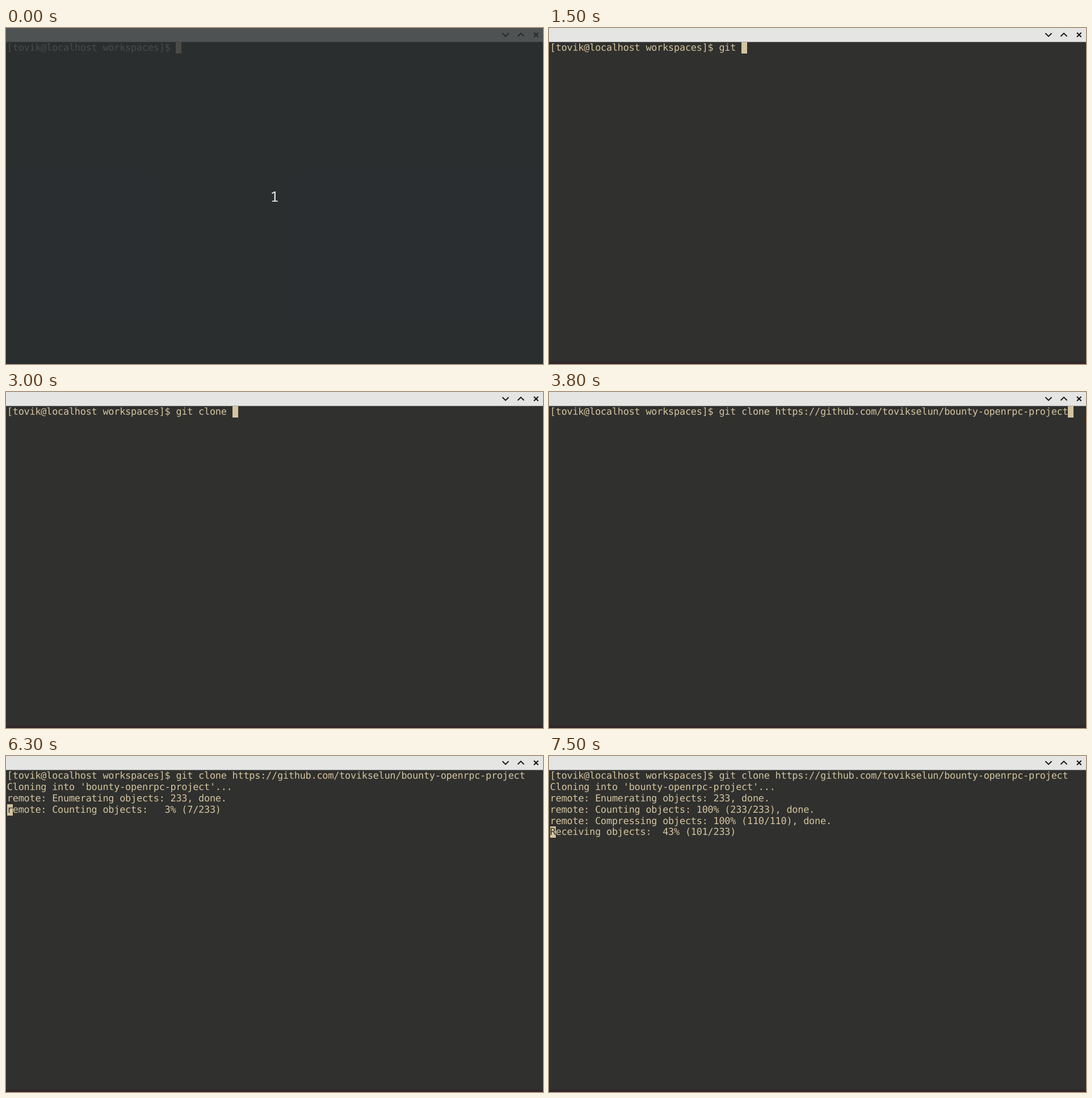
An HTML page for the animation above (8000 ms loop, 946 by 592 pixels).

```html
<!DOCTYPE html>
<html lang="en">
<head>
<meta charset="utf-8">
<title>Terminal: git clone</title>
<style>
  :root { --cell: 9.92px; --row: 19.84px; --left: 1.8px; --top: 25.2px; --ink: #d4c4a0; --paper: #30302e; }
  html, body { margin: 0; width: 100%; height: 100%; overflow: hidden; background: var(--paper); }
  #stage { position: relative; width: 946px; height: 592px; overflow: hidden; background: var(--paper); }
  #stage > * { position: absolute; }
  #bar { left: 0; top: 0; width: 946px; height: 24px; background: #e5e5e3; border-bottom: 1px solid #a3a3a1; }
  #bar path { fill: none; stroke: #161616; stroke-width: 1.9; }
  #edge { left: 0; top: 588px; width: 946px; height: 4px; background: #302629; }
  #screen, #cursor {
    margin: 0; white-space: pre; color: var(--ink);
    font: 16.87px/var(--row) "DejaVu Sans Mono", monospace;
    letter-spacing: calc(var(--cell) - 1ch);
    font-variant-ligatures: none; text-rendering: geometricPrecision;
  }
  #screen { left: var(--left); top: var(--top); }
  #cursor {
    left: calc(var(--left) + var(--col) * var(--cell)); top: calc(var(--top) + var(--line) * var(--row));
    width: var(--cell); height: var(--row); background: var(--ink); color: var(--paper);
  }
  #count {
    inset: 0; background: rgba(40, 45, 48, .8); color: #e9e9e8;
    font: 26px/592px "Noto Sans Mono", monospace; text-align: center;
  }
</style>
</head>
<body>
<div id="stage">
  <svg id="bar" viewBox="0 0 946 24">
    <path d="M874.5 9.3 880 14.7 885.5 9.3M901.5 14.7 907 9.3 912.5 14.7"/>
    <path d="M930 8.2 937.6 15.8M937.6 8.2 930 15.8" style="stroke-width:2.1"/>
  </svg>
  <div id="edge"></div>
  <pre id="screen"></pre>
  <div id="cursor"></div>
  <div id="count">1</div>
</div>
<script>
const LOOP = 8000;
const PROMPT = '[tovik@localhost workspaces]$ ';
const COMMAND = 'git clone https://github.com/tovikselun/bounty-openrpc-project';

// [time, number of command characters entered]
const typing = [
  [0, 0], [1000, 1], [1300, 2], [1400, 3], [1500, 4], [2100, 5],
  [2400, 7], [2600, 8], [2700, 9], [3000, 10], [3800, COMMAND.length]
];

const progress = (label, done, total) => {
  const percent = String(Math.floor(done / total * 100)).padStart(3);
  return `${label} objects: ${percent}% (${done}/${total})`;
};
const counting = n => progress('remote: Counting', n, 233);
const compressing = n => progress('remote: Compressing', n, 110);
const receiving = n => progress('Receiving', n, 233);

const cloning = [PROMPT + COMMAND, "Cloning into 'bounty-openrpc-project'..."];
const listed = [...cloning, 'remote: Enumerating objects: 233, done.'];
const counted = [...listed, counting(233) + ', done.'];
const compressed = [...counted, compressing(110) + ', done.'];

// [time, visible lines]; the cursor waits at the start of the last line
const output = [
  [5000, [...cloning, '']],
  [6300, [...listed, counting(7)]],
  [6500, [...listed, counting(159)]],
  [6900, [...counted, compressing(22)]],
  [7000, [...counted, compressing(84)]],
  [7100, [...compressed, receiving(14)]],
  [7500, [...compressed, receiving(101)]]
];

const steps = [
  ...typing.map(([time, n]) => {
    const line = PROMPT + COMMAND.slice(0, n);
    return { time, lines: [line], col: line.length };
  }),
  ...output.map(([time, lines]) => ({ time, lines, col: 0 }))
];

const [screen, cursor, count] = ['screen', 'cursor', 'count'].map(id => document.getElementById(id));
let shown;

function show(step) {
  const line = step.lines.length - 1;
  screen.textContent = step.lines.join('\n');
  cursor.textContent = step.lines[line][step.col] || '';
  cursor.style.setProperty('--col', step.col);
  cursor.style.setProperty('--line', line);
  shown = step;
}

const start = performance.now();
function frame() {
  const t = (performance.now() - start) % LOOP;
  const step = steps.findLast(s => s.time <= t);
  if (step !== shown) show(step);
  count.hidden = t >= 500;
  requestAnimationFrame(frame);
}
frame();
</script>
</body>
</html>
```
